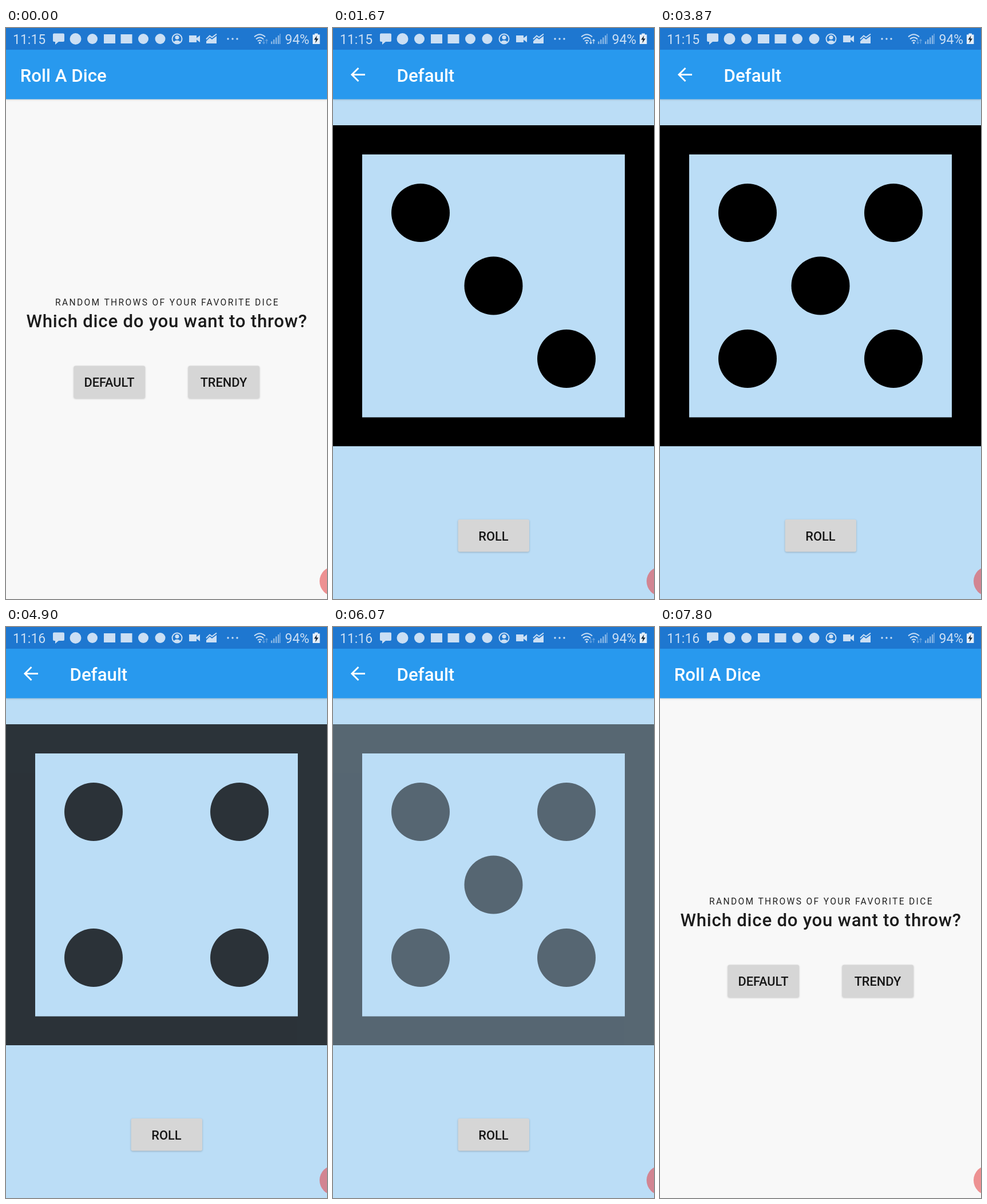
Write an HTML page that moves like this. It is 561 px wide and 998 px high and loops after 8 s.

```html
<!DOCTYPE html>
<html lang="en">
<head>
<meta charset="utf-8">
<title>Roll A Dice</title>
<style>
  html, body { margin: 0; width: 100%; height: 100%; overflow: hidden; background: #f8f8f8; }
  svg { display: block; width: 100%; height: 100%; font-family: Roboto, sans-serif; }
  .bar { fill: #2899ee; filter: drop-shadow(0 1px 1.5px rgba(0, 0, 0, .16)); }
  .title { fill: #fff; font-size: 31.2px; font-weight: 500; }
  .button rect { fill: #d6d6d6; filter: drop-shadow(0 1.5px 1.5px rgba(0, 0, 0, .22)); }
  .button .press { fill: #bcbcbc; filter: drop-shadow(0 3px 3px rgba(0, 0, 0, .2)); opacity: 0; }
  .button text { fill: #161616; font-size: 21.8px; font-weight: 500; text-anchor: middle; }
  .status { fill: #cbdff4; font-size: 23px; }
  .line { fill: none; stroke: #cbdff4; stroke-width: 2; }
  .dark { fill: #1e77d0; }
</style>
</head>
<body>
<svg viewBox="0 0 561 998" preserveAspectRatio="none">
  <g id="home">
    <rect width="561" height="998" fill="#f8f8f8"/>
    <rect class="bar" y="30" width="561" height="94.5"/>
    <text class="title" x="24.8" y="94">Roll A Dice</text>
    <text x="86" y="485" font-size="15.6" letter-spacing="2.34" fill="#222">RANDOM THROWS OF YOUR FAVORITE DICE</text>
    <text x="35.5" y="523" font-size="31.2" font-weight="500" letter-spacing=".76" fill="#1c1c1c">Which dice do you want to throw?</text>
    <g class="button" id="default">
      <rect x="118.5" y="590.5" width="124.5" height="56.5" rx="3"/>
      <rect class="press" x="118.5" y="590.5" width="124.5" height="56.5" rx="3"/>
      <text x="180.5" y="627">DEFAULT</text>
    </g>
    <g class="button">
      <rect x="318.5" y="590.5" width="124.5" height="56.5" rx="3"/>
      <text x="380.5" y="627">TRENDY</text>
    </g>
  </g>

  <g id="game">
    <rect width="561" height="998" fill="#bbddf6"/>
    <rect class="bar" y="30" width="561" height="94.5"/>
    <circle id="ripple" cx="43.5" cy="81" r="31" fill="#fff" opacity="0"/>
    <path d="M56 81.5H33M44.5 70 33 81.5 44.5 93" fill="none" stroke="#fff" stroke-width="3"/>
    <text class="title" x="111.5" y="94">Default</text>
    <g id="die">
      <path d="M0 170H561V731H0ZM51 221V680.5H510V221Z"/>
      <g id="pips"></g>
    </g>
    <g class="button" id="roll">
      <rect x="218.5" y="859" width="124.5" height="56.5" rx="3"/>
      <rect class="press" x="218.5" y="859" width="124.5" height="56.5" rx="3"/>
      <text x="280.5" y="896">ROLL</text>
    </g>
  </g>

  <g class="status">
    <rect class="dark" width="561" height="38"/>
    <text id="clock" x="12" y="27.5">11:15</text>
    <path d="M84 9.5H100Q102 9.5 102 11.5V22Q102 24 100 24H92L86 29V24H84Q82 24 82 22V11.5Q82 9.5 84 9.5Z"/>
    <circle cx="121.5" cy="19" r="10"/>
    <circle cx="151" cy="19" r="9"/>
    <rect x="171" y="11" width="20" height="16"/>
    <rect x="200.5" y="11" width="20" height="16"/>
    <circle cx="240" cy="19" r="9"/>
    <circle cx="269.5" cy="19" r="9"/>
    <circle class="line" cx="299" cy="19" r="8.5"/>
    <circle cx="299" cy="16.5" r="3.6"/>
    <path d="M292.5 24.5Q299 18.500 305.5 24.5Q299 30 292.5 24.5Z"/>
    <path d="M320 13H333V17.5L339 13V25L333 20.5V25H320Z"/>
    <path d="M350 27V23L356 17 360 20 368 14V27Z"/>
    <path class="line" d="M350 19.5 356 13.5 360 16.5 368 10.5"/>
    <g><circle cx="388" cy="19" r="1.7"/><circle cx="396" cy="19" r="1.7"/><circle cx="404" cy="19" r="1.7"/></g>
    <path class="line" d="M434 15.5Q443.5 7 453 15.5M437 19.5Q443.5 13.5 450 19.5M440 23Q443.5 20 447 23"/>
    <circle cx="443.5" cy="26" r="1.8"/>
    <path id="arrows" class="line" style="stroke-width:1.3" d="M450.5 20V27M448.5 25 450.5 27.5 452.5 25M455.5 27.5V20.5M453.5 22.5 455.5 20 457.5 22.5"/>
    <path opacity=".6" d="M463 23.5H465.5V28H463ZM467 20H469.5V28H467ZM471 16.5H473.5V28H471ZM475 13H477.5V28H475Z"/>
    <path opacity=".4" d="M478.2 10H480V28H478.2Z"/>
    <text x="487.5" y="27.5">94%</text>
    <path d="M539.5 9.5H545V11.5H548.5V28H536V11.5H539.5Z" fill="#e4eef9"/>
    <path d="M543.5 13 538.5 20.5H541.8L540.5 26.5 546 18.5H542.5Z" fill="#123"/>
  </g>
  <circle cx="574" cy="967" r="26" fill="#e53e40" fill-opacity=".55"/>
</svg>
<script>
const LOOP = 8000, FADE = 1000;
const OPEN = 870, CLOSE = 7400;
const rolls = [
  { press: 0, click: -FADE, face: 3 },
  { press: 2140, click: 2270, face: 5 },
  { press: 4110, click: 4220, face: 4 },
  { press: 5440, click: 5550, face: 5 }
];
const $ = selector => document.querySelector(selector);
const clamp = x => Math.min(1, Math.max(0, x));
const ramp = (t, start, length) => clamp((t - start) / length);
const decelerate = x => 1 - (1 - x) ** 4;
const smooth = x => (1 - Math.cos(Math.PI * x)) / 2;
const pulse = (t, down, up) => ramp(t, down, 60) * (1 - ramp(t, up, 200));

const home = $('#home'), game = $('#game'), die = $('#die'), pips = $('#pips');
const defaultPress = $('#default .press'), rollPress = $('#roll .press');
const ripple = $('#ripple'), clock = $('#clock'), arrows = $('#arrows');

// Each pip: column, row, and the faces that show it.
[[-1, -1, '23456'], [1, 1, '23456'], [1, -1, '456'], [-1, 1, '456'],
 [0, 0, '135'], [-1, 0, '6'], [1, 0, '6']].forEach(([col, row, faces]) => {
  const pip = document.createElementNS('http://www.w3.org/2000/svg', 'circle');
  pip.setAttribute('cx', 280.5 + col * 127.5);
  pip.setAttribute('cy', 450.5 + row * 127.5);
  pip.setAttribute('r', 51);
  pip.dataset.faces = faces;
  pips.append(pip);
});

function draw(t) {
  const visible = ramp(t, OPEN, 200) * (1 - ramp(t, CLOSE, 250));
  const shift = 80 * (1 - decelerate(ramp(t, OPEN, 350)) + ramp(t, CLOSE, 300) ** 2);
  game.style.opacity = visible;
  game.setAttribute('transform', `translate(0 ${shift})`);
  home.style.visibility = visible === 1 ? 'hidden' : 'visible';

  const roll = rolls.filter(r => t >= r.click).pop();
  die.style.opacity = smooth(ramp(t, roll.click, FADE));
  for (const pip of pips.children)
    pip.style.display = pip.dataset.faces.includes(roll.face) ? '' : 'none';

  defaultPress.style.opacity = pulse(t, 650, 1000);
  rollPress.style.opacity = Math.max(...rolls.slice(1).map(r => pulse(t, r.press, r.click + 40)));
  ripple.style.opacity = .2 * pulse(t, 7260, 7400);
  clock.textContent = t < 4600 ? '11:15' : '11:16';
  arrows.style.opacity = t > OPEN && t < 3370 ? 1 : .4;
}

const start = performance.now();
function tick() {
  draw((performance.now() - start) % LOOP);
  requestAnimationFrame(tick);
}
tick();
</script>
</body>
</html>
```
